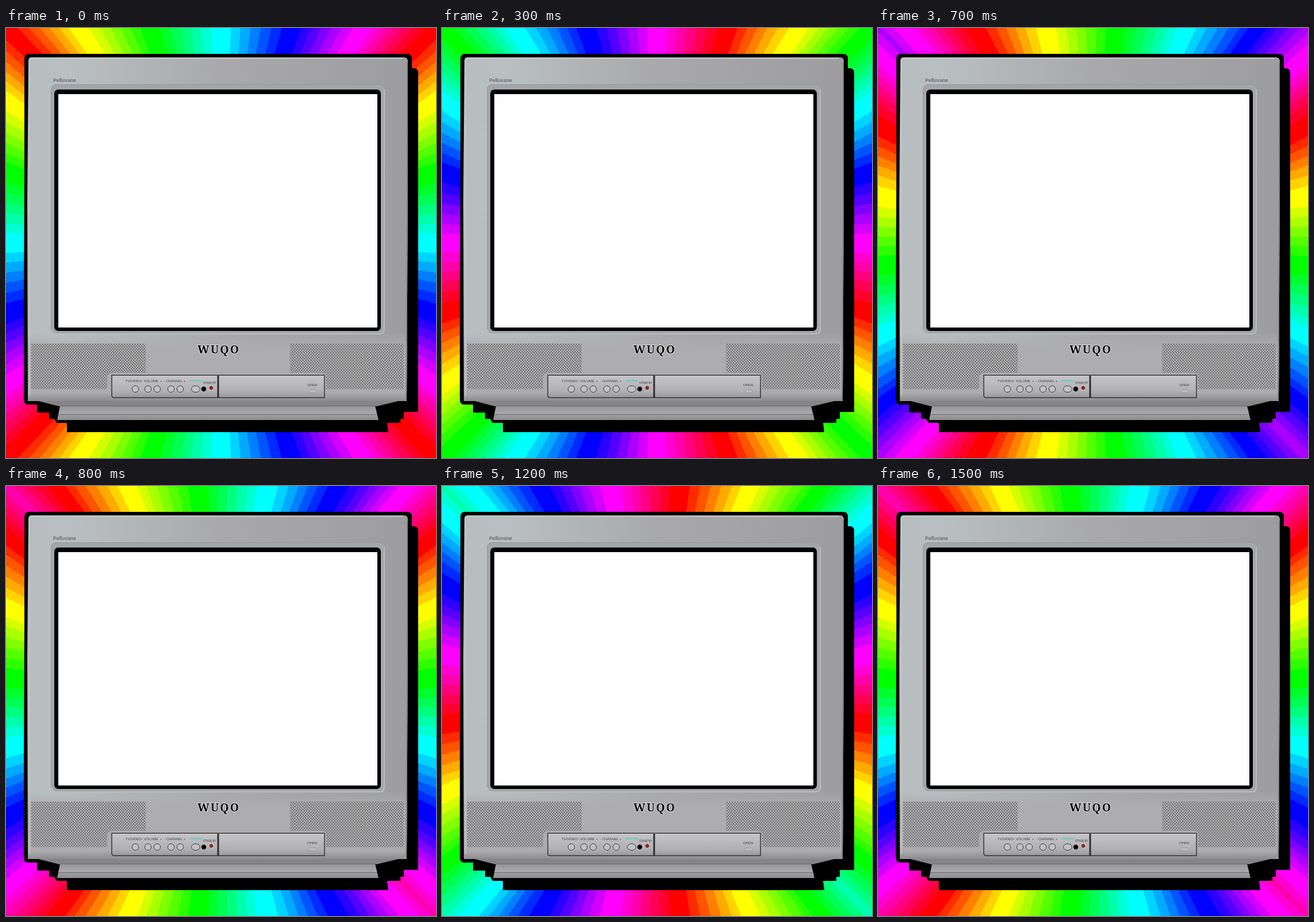
An HTML page without scripts that plays this animation: 748x748 px, repeating every 1.6 s.

```html
<!DOCTYPE html>
<html lang="en">
<head>
<meta charset="utf-8">
<title>Rainbow television</title>
<style>
@property --h { syntax: "<number>"; inherits: true; initial-value: 0; }

html, body { margin: 0; width: 100%; height: 100%; overflow: hidden; }

.stage {
  position: relative; width: 748px; height: 748px; overflow: hidden;
  animation: hue 1.6s step-end infinite;
}

/* Hue jumps 40 degrees per tick; the second lap skips two steps. */
@keyframes hue {
  0%, 56.25%     { --h: 0; }
  6.25%, 62.5%   { --h: 40; }
  12.5%, 68.75%  { --h: 80; }
  18.75%         { --h: 120; }
  25%, 75%       { --h: 160; }
  31.25%, 81.25% { --h: 200; }
  37.5%, 87.5%   { --h: 240; }
  43.75%         { --h: 280; }
  50%, 93.75%    { --h: 320; }
  100%           { --h: 0; }
}

/* One hue cycle per side, evenly spaced along the edge: angles are 45 + atan(n/3).
   The lower left half mirrors the upper right one; the filter cuts it into rays. */
.stage::before, .stage::after {
  content: ""; position: absolute; inset: 0; filter: url(#rays);
  background: repeating-conic-gradient(from -45deg in hsl,
    hsl(calc(var(--h) + 0) 100% 50%) 0deg,
    hsl(calc(var(--h) + 60) 100% 50%) 11.3deg,
    hsl(calc(var(--h) + 120) 100% 50%) 26.6deg,
    hsl(calc(var(--h) + 180) 100% 50%) 45deg,
    hsl(calc(var(--h) + 240) 100% 50%) 63.4deg,
    hsl(calc(var(--h) + 300) 100% 50%) 78.7deg,
    hsl(calc(var(--h) + 360) 100% 50%) 90deg);
}
.stage::after {
  transform: matrix(0, 1, 1, 0, 0, 0);
  clip-path: polygon(0 0, 100% 0, 100% 100%);
}

svg { position: absolute; inset: 0; z-index: 1; display: block; }
text { font-family: "Liberation Sans", Arial, sans-serif; fill: #3c3c40; }
.label { font-size: 6px; }
.model { font-size: 8.5px; font-weight: bold; fill: #6b6b70; }
.brand {
  font: bold 19.5px "Noto Serif", serif; letter-spacing: 2px; text-anchor: middle;
  fill: #000; stroke: #e4e4e4; stroke-width: 2px; paint-order: stroke;
}
.knobs { fill: #c2c2c4; stroke: #3f3f42; }
</style>
</head>
<body>
<div class="stage">
<svg width="748" height="748" viewBox="0 0 748 748">
  <defs>
    <filter id="rays" x="0" y="0" width="1" height="1" color-interpolation-filters="sRGB">
      <feComponentTransfer>
        <feFuncR type="discrete" tableValues="0 .17 .33 .5 .67 .83 1"/>
        <feFuncG type="discrete" tableValues="0 .17 .33 .5 .67 .83 1"/>
        <feFuncB type="discrete" tableValues="0 .17 .33 .5 .67 .83 1"/>
      </feComponentTransfer>
    </filter>
    <linearGradient id="shell">
      <stop stop-color="#b7bdbf"/>
      <stop offset=".1" stop-color="#bac0c1"/>
      <stop offset=".5" stop-color="#a9a9ab"/>
      <stop offset="1" stop-color="#9d9da0"/>
    </linearGradient>
    <linearGradient id="chin" x2="0" y2="1">
      <stop stop-color="#adadaf" stop-opacity="0"/>
      <stop offset=".25" stop-color="#adadaf"/>
      <stop offset=".88" stop-color="#acacae"/>
      <stop offset="1" stop-color="#8c8c8f"/>
    </linearGradient>
    <linearGradient id="panel" x2="0" y2="1">
      <stop stop-color="#c5c5c7"/>
      <stop offset=".7" stop-color="#b1b1b3"/>
      <stop offset="1" stop-color="#98989a"/>
    </linearGradient>
    <linearGradient id="foot" x2="0" y2="1">
      <stop stop-color="#949497"/>
      <stop offset=".5" stop-color="#a8a8aa"/>
      <stop offset="1" stop-color="#8b8b8e"/>
    </linearGradient>
    <pattern id="holes" width="4.6" height="5" x="44" y="549" patternUnits="userSpaceOnUse">
      <path fill="#b3b3b4" d="M0 0H4.6V5H0Z"/>
      <g fill="#47474a">
        <circle cx="1.15" cy="1.25" r="1.05"/>
        <circle cx="3.45" cy="3.75" r="1.05"/>
      </g>
    </pattern>
  </defs>

  <!-- outline and drop shadow -->
  <path d="M40 45H698Q706 45 706 53V70H711Q717 71 717 78V668H692V680H686V687H663L665 703H106V687H88L84 680H75V669H54V655H36Q31 653 31 646V470L32 250V54Q32 45 40 45Z"/>

  <!-- cabinet -->
  <path fill="url(#shell)" d="M44 51H692Q699 51 699 58V300L697 649H38L37 300L39 57Q39 51 44 51Z"/>
  <path fill="url(#chin)" d="M38 530H698L697 649H38Z"/>
  <path fill="none" stroke="#c6c9ca" stroke-width="1.5" d="M41 640V58Q41 53 46 53H690"/>
  <path fill="none" stroke="#85858a" stroke-width="2" d="M698 60V300L696 646"/>
  <path stroke="#000" stroke-width="5" stroke-linecap="round" d="M213 48H244M503 48H529"/>

  <!-- screen -->
  <rect x="78.5" y="98.5" width="580" height="434" rx="8" fill="#a3a6a8" stroke="#94979a"/>
  <path fill="none" stroke="#bcbdbf" stroke-width="2" d="M79 524Q79 532 87 532H650Q658 532 658 524V106"/>
  <rect x="84" y="107" width="568" height="420" rx="7"/>
  <path fill="#fff" d="M91 115H646V521H91Z"/>

  <!-- speakers -->
  <path fill="url(#holes)" d="M44 549H243V600H184Q176 600 176 608V628H44ZM494 549H692V628H557V608Q557 600 549 600H494Z"/>

  <!-- controls -->
  <path fill="url(#panel)" stroke="#343437" stroke-width="1.5" d="M184 604H554V643H188Q184 643 184 639Z"/>
  <path stroke="#2c2c30" stroke-width="3" d="M369 605V643"/>
  <path stroke="#d2d2d4" d="M186 605.5H367M372 605.5H553"/>
  <g class="knobs">
    <circle cx="225" cy="628" r="5.7"/>
    <circle cx="247" cy="628" r="5.7"/>
    <circle cx="263" cy="628" r="5.7"/>
    <circle cx="287" cy="628" r="5.7"/>
    <circle cx="303" cy="628" r="5.7"/>
    <ellipse cx="330" cy="628" rx="7.5" ry="5.7"/>
  </g>
  <circle cx="344" cy="628" r="4.2"/>
  <circle cx="357" cy="626" r="2.6" fill="#c01818" stroke="#5d1010"/>
  <rect x="527" y="629.5" width="13" height="5" rx="2" fill="#bdbdbf" stroke="#99999c"/>
  <g class="label">
    <text x="208" y="616">TV/VIDEO</text>
    <text x="236" y="616">- VOLUME</text>
    <text x="268" y="616">+</text>
    <text x="275" y="616">- CHANNEL</text>
    <text x="309" y="616">+</text>
    <text x="343" y="619" font-size="4.6">STAND BY</text>
    <text x="524" y="623">OPEN</text>
  </g>
  <path stroke="#62c9c3" stroke-width="2" d="M319 613.5H341"/>

  <text class="model" x="82" y="94">Pelluvane</text>
  <text class="brand" x="370" y="566">WUQO</text>

  <!-- foot -->
  <path fill="#858588" d="M57 649H682L645 658H92Z"/>
  <path fill="url(#foot)" d="M94 657H642L648 682H89Z"/>
  <path stroke="#6a6a6d" d="M93 657.5H643M91 672.5H646"/>
</svg>
</div>
</body>
</html>
```
